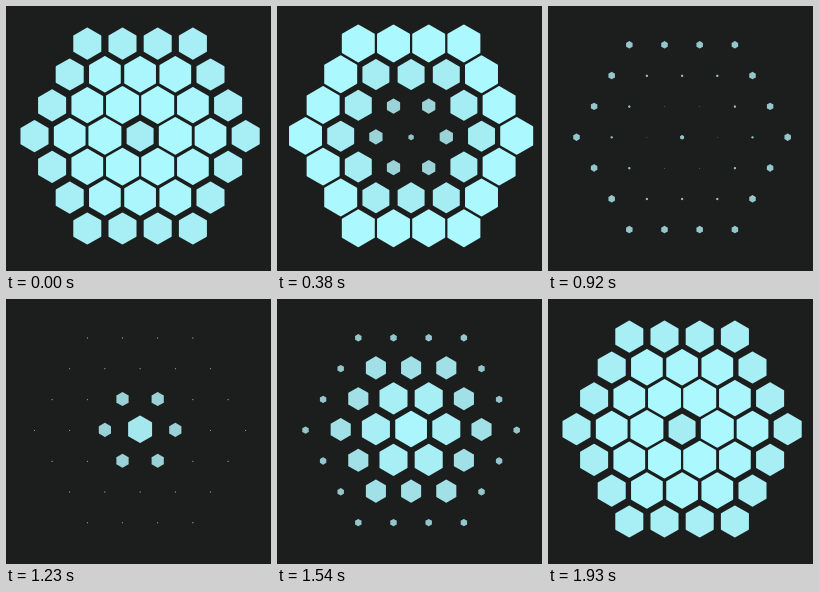
These frames come from a looping animation (265x265 px, 2010 ms). An HTML page with a canvas:

```html
<!DOCTYPE html>
<html lang="en">
<head>
<meta charset="utf-8">
<title>Hexagon pulse</title>
<style>
  html, body { margin: 0; width: 100%; height: 100%; overflow: hidden; background: #1c1e1d; }
  canvas { display: block; }
</style>
</head>
<body>
<canvas id="stage" width="265" height="265"></canvas>
<script>
const ctx = document.getElementById('stage').getContext('2d');

// How long each step of the loop holds, in units of 10 ms
const HOLDS = [...'78878887888778887888888788'].map(Number);
const LOOP = 2010;

const ZOOM = 1.1;
const CENTER = { x: 134.1, y: 131.5 };
const BRIGHT = [171, 248, 255];
const DIM = [144, 187, 191];

// Hexagonal grid, three rings around the middle cell
const cells = [];
for (let r = -3; r <= 3; r++) {
  for (let q = -3; q <= 3; q++) {
    const ring = Math.max(Math.abs(q), Math.abs(r), Math.abs(q + r));
    if (ring <= 3) cells.push({ ring, x: (q + r / 2) * 32, y: r * 28 });
  }
}

// Standard "ease": cubic-bezier(.25, .1, .25, 1)
function ease(x) {
  const curve = (p, a, b) => 3 * (1 - p) ** 2 * p * a + 3 * (1 - p) * p * p * b + p ** 3;
  let lo = 0, hi = 1;
  for (let i = 0; i < 24; i++) {
    const mid = (lo + hi) / 2;
    if (curve(mid, 0.25, 0.25) < x) lo = mid; else hi = mid;
  }
  return curve(lo, 0.1, 1);
}

// 0 = full size and bright, 1 = shrunk and dim; one second each way
function shrink(seconds) {
  const t = (seconds + 2) % 2;
  return t < 1 ? ease(t) : 1 - ease(t - 1);
}

function stepAt(ms) {
  let step = 0;
  for (let end = HOLDS[0] * 10; ms >= end && step < HOLDS.length - 1; end += HOLDS[step] * 10) step++;
  return step;
}

// Three crossed bars form a hexagon, sitting slightly above its scaling origin
function drawHex({ x, y }, amount) {
  const size = 1 - 0.99 * amount;
  const color = BRIGHT.map((c, i) => Math.round(c + (DIM[i] - c) * amount));
  ctx.fillStyle = `rgb(${color})`;
  ctx.save();
  ctx.translate(x, y);
  ctx.scale(size, size);
  ctx.translate(0, -1.5);
  for (let i = 0; i < 3; i++) {
    ctx.fillRect(-15, -8.5, 30, 17);
    ctx.rotate(Math.PI / 3);
  }
  ctx.restore();
}

function draw(now) {
  const seconds = 0.15 + 0.08 * stepAt(now % LOOP);
  const levels = [0, 1, 2, 3].map(ring => shrink(seconds - 0.2 * ring));
  ctx.setTransform(1, 0, 0, 1, 0, 0);
  ctx.fillStyle = '#1c1e1d';
  ctx.fillRect(0, 0, 265, 265);
  ctx.setTransform(ZOOM, 0, 0, ZOOM, CENTER.x, CENTER.y);
  for (const cell of cells) drawHex(cell, levels[cell.ring]);
}

const start = performance.now();
function tick() {
  draw(performance.now() - start);
  requestAnimationFrame(tick);
}
tick();
</script>
</body>
</html>
```
